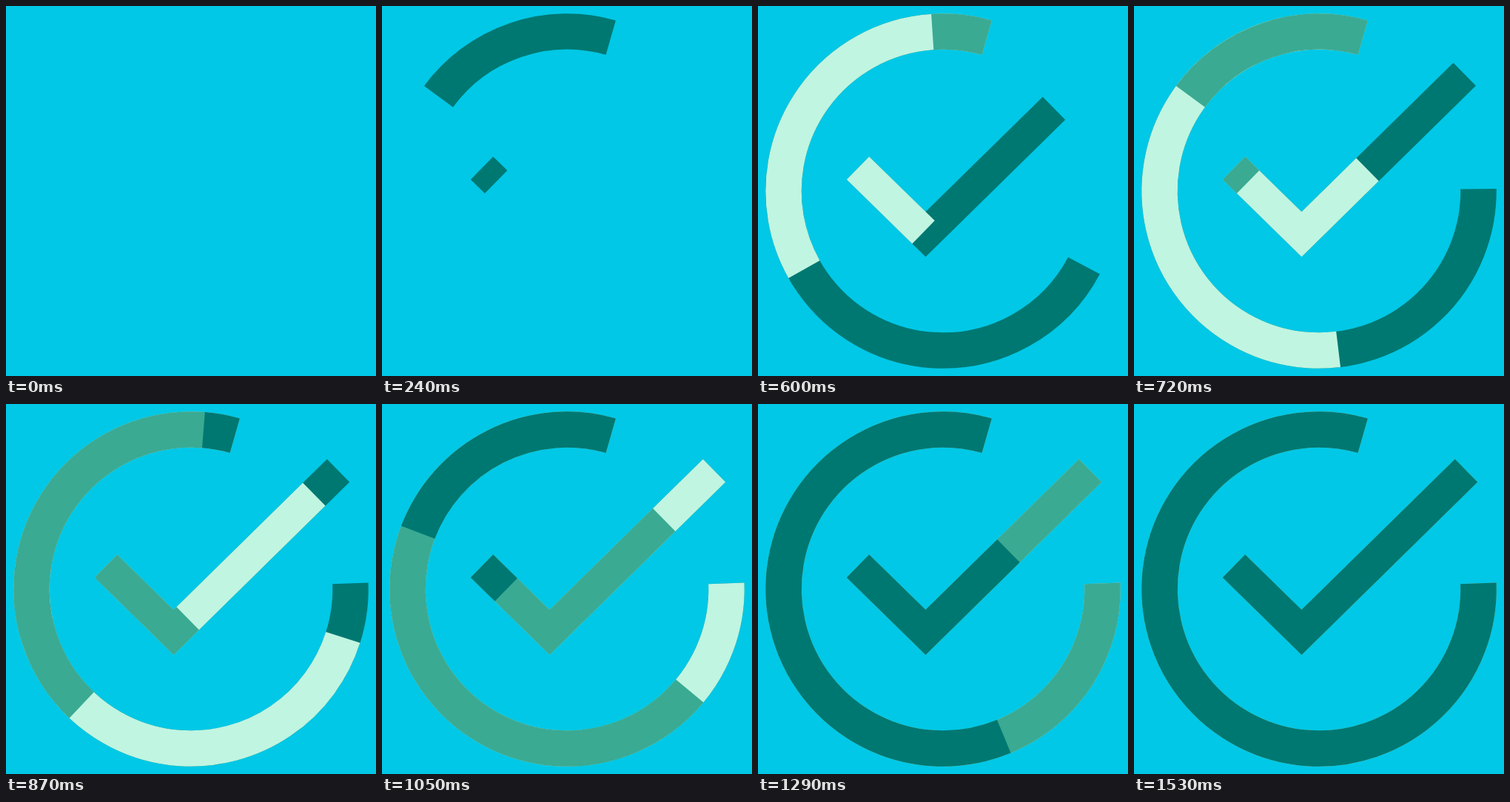
Recreate the animation shown at these times as an HTML page. Size 500x500 px, loop 1.83 s.

```html
<!DOCTYPE html>
<html lang="en">
<head>
<meta charset="utf-8">
<title>Check mark loop</title>
<style>
  /* Clock in ms, advancing in 30 ms ticks */
  @property --t {
    syntax: "<number>";
    inherits: true;
    initial-value: 0;
  }
  @keyframes clock {
    from { --t: 0; }
    to { --t: 1830; }
  }
  html, body {
    margin: 0;
    height: 100%;
    overflow: hidden;
    background: #00c8e6;
  }
  svg {
    display: block;
    width: 100vw;
    height: 100vh;
    animation: clock 1830ms steps(61) infinite;
  }
  .dark { stroke: #007872; }
  .light { stroke: #c0f5e1; }
  .mid { stroke: #3aaa92; }

  /* --lag: delay after the layer starts, --dur: drawing time */
  .ring { --lag: 0; --dur: 750; stroke-width: 48.5px; }
  .tick { --lag: 150; --dur: 600; stroke-width: 43.5px; }

  /* Each stroke is drawn on with a smoothstep ease */
  .ring, .tick {
    --s: clamp(0, (var(--t) - var(--start) - var(--lag)) / var(--dur), 1);
    fill: none;
    stroke-miterlimit: 10;
    stroke-dasharray: 1px 2px;
    stroke-dashoffset: calc(1px * (1 - var(--s) * var(--s) * (3 - 2 * var(--s))));
  }
</style>
</head>
<body>
<svg viewBox="0 0 500 500">
  <g class="dark" style="--start: 0">
    <path class="ring" pathLength="1" d="M309.2 42.8A215.5 215.5 0 1 0 465.4 242.3"/>
    <path class="tick" pathLength="1" d="M135 219L226.5 308.5L449 90"/>
  </g>
  <g class="light" style="--start: 240">
    <path class="ring" pathLength="1" d="M309.2 42.8A215.5 215.5 0 1 0 465.4 242.3"/>
    <path class="tick" pathLength="1" d="M135 219L226.5 308.5L449 90"/>
  </g>
  <g class="mid" style="--start: 480">
    <path class="ring" pathLength="1" d="M309.2 42.8A215.5 215.5 0 1 0 465.4 242.3"/>
    <path class="tick" pathLength="1" d="M135 219L226.5 308.5L449 90"/>
  </g>
  <g class="dark" style="--start: 780">
    <path class="ring" pathLength="1" d="M309.2 42.8A215.5 215.5 0 1 0 465.4 242.3"/>
    <path class="tick" pathLength="1" d="M135 219L226.5 308.5L449 90"/>
  </g>
</svg>
</body>
</html>
```
